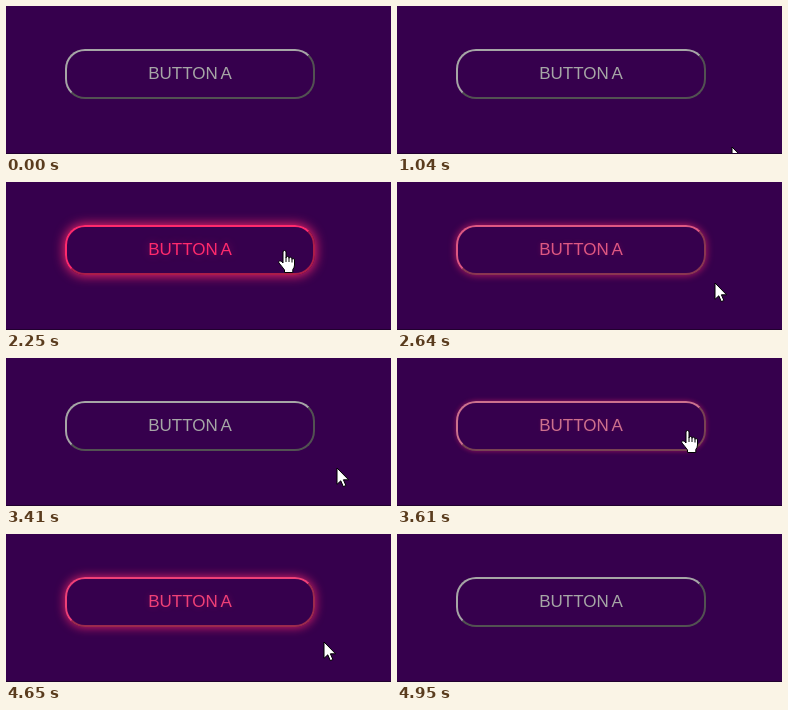
Animation of 385x148 px, one loop 5500 ms. Source, as an HTML page:

```html
<!DOCTYPE html>
<html lang="en">
<head>
<meta charset="utf-8">
<title>Glowing button</title>
<style>
html, body { margin: 0; width: 100%; height: 100%; overflow: hidden; background: #36004d; }
#stage { position: relative; width: 385px; height: 148px; overflow: hidden; background: #36004d; }
#stage::after { content: ""; position: absolute; left: 0; right: 0; bottom: 0; height: 1px; background: #21002f; }
#button {
  position: absolute; left: 59px; top: 43px; width: 250px; height: 50px;
  box-sizing: border-box; border: 2px solid; border-radius: 20px;
}
svg { position: absolute; left: 0; top: 0; }
text { font: 17px "Liberation Sans", Arial, sans-serif; word-spacing: -1px; text-anchor: middle; }
#arrow, #hand { fill: #fff; stroke: #000; stroke-width: 1; stroke-linejoin: round; }
</style>
</head>
<body>
<div id="stage">
  <div id="button"></div>
  <svg width="385" height="148" viewBox="0 0 385 148">
    <text id="label" x="184" y="73">BUTTON A</text>
    <path id="arrow" d="M0 0V16.3L3.8 12.8L6.3 18.6L8.9 17.5L6.4 11.8H11.6Z"/>
    <g id="hand">
      <path d="M5 13V2Q5 .5 6.5 .5T8 2V8Q8 6.5 9.5 6.5T11 8V8.6Q11 7.2 12.5 7.2T14 9V9.6Q14 8.3 15.2 8.5Q16.5 8.7 16.5 10V15Q16.5 17.5 14.8 19.5V22.5H6.5V20Q4 16.5 .8 12.8Q.4 11 1.8 10.7Q3 10.7 5 13Z"/>
      <path d="M8 8V12M11 8.6V12M14 9.6V12.5" fill="none"/>
    </g>
  </svg>
</div>
<script>
const LOOP = 5500, FADE = 350;
const GRAY = [166, 166, 166], PINK = [255, 42, 109];
const $ = id => document.getElementById(id);
const button = $("button"), label = $("label"), arrow = $("arrow"), hand = $("hand");

// Pointer tip: time, x, y
const path = [
  [1040, 335, 141], [1090, 334, 139], [1165, 305, 92], [1320, 272, 66], [1420, 268, 62],
  [2110, 268, 62], [2300, 282, 70], [2560, 311, 94], [2640, 318, 101], [2670, 318, 101],
  [2920, 331, 110], [3410, 331, 110], [3520, 308, 92], [3610, 290, 72], [3720, 283, 70],
  [4470, 283, 70], [4600, 301, 93], [4700, 335, 122], [4780, 345, 150]
];
// Hover changes: time, state
const hovers = [[1155, 1], [2560, 0], [3520, 1], [4600, 0]];

const mix = (a, b, k) => a + (b - a) * k;
const rgb = c => `rgb(${c.map(Math.round).join(",")})`;

// Shaded side of an outset border
function dark(c) {
  const max = Math.max(...c);
  return c.map(v => v * Math.max(0, (max - 84) / max));
}

// cubic-bezier(.25, .1, .25, 1)
function ease(x) {
  if (x <= 0) return 0;
  if (x >= 1) return 1;
  const curve = (a, b, s) => 3 * a * s * (1 - s) ** 2 + 3 * b * s * s * (1 - s) + s ** 3;
  let lo = 0, hi = 1;
  for (let i = 0; i < 20; i++) {
    const mid = (lo + hi) / 2;
    if (curve(.25, .25, mid) < x) lo = mid; else hi = mid;
  }
  return curve(.1, 1, lo);
}

function glowAt(t) {
  let glow = 0;
  for (const [start, state] of hovers) {
    if (t >= start) glow = mix(1 - state, state, ease((t - start) / FADE));
  }
  return glow;
}

function pointerAt(t) {
  const i = path.findIndex(p => p[0] > t);
  if (i < 1) return null;
  const [t0, x0, y0] = path[i - 1], [t1, x1, y1] = path[i];
  const k = (t - t0) / (t1 - t0);
  return [mix(x0, x1, k), mix(y0, y1, k)];
}

function place(el, show, x, y) {
  el.style.display = show ? "" : "none";
  if (show) el.setAttribute("transform", `translate(${Math.round(x)} ${Math.round(y)})`);
}

function draw(t) {
  const k = glowAt(t);
  const color = GRAY.map((v, i) => mix(v, PINK[i], k));
  const light = rgb(color), shade = rgb(dark(color));
  button.style.borderColor = `${light} ${shade} ${shade} ${light}`;
  button.style.boxShadow = `0 0 ${11 * k}px ${k}px rgba(255,42,109,${.9 * k})`;
  label.style.fill = light;
  label.style.textShadow = `0 0 ${8 * k}px rgba(255,42,109,${.35 * k})`;

  const p = pointerAt(t), [x, y] = p || [0, 0];
  const over = x < 309 && y < 93;
  place(arrow, p && !over, x, y);
  place(hand, p && over, x - 6, y);
}

function tick() {
  draw(performance.now() % LOOP);
  requestAnimationFrame(tick);
}
tick();
</script>
</body>
</html>
```
